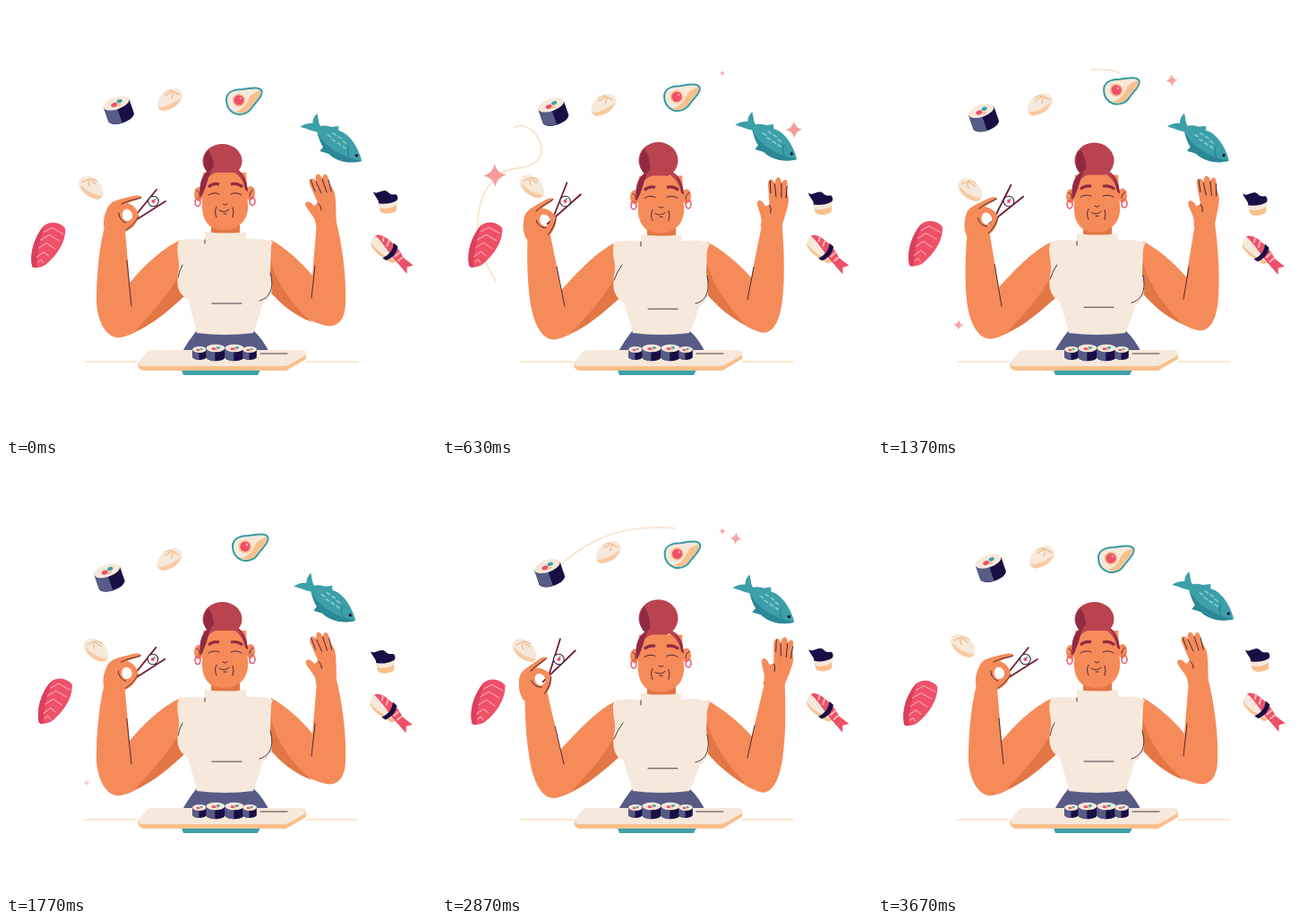
Animation, 480 px wide and 480 px high, one loop 3.7 s. Source, as an HTML page:

```html
<!DOCTYPE html>
<html lang="en">
<head>
<meta charset="utf-8">
<title>Sushi lunch</title>
<style>
html, body { margin: 0; width: 100%; height: 100%; overflow: hidden; background: #fff; }
svg { display: block; width: 100vw; height: 100vh; }
.skin { fill: #f68b5a; }
.shade { fill: #e37645; }
.cream { fill: #f6e8da; }
.peach { fill: #f9bf8c; }
.navy { fill: #190f45; }
.slate { fill: #575b86; }
.teal { fill: #3c9fa9; }
.red { fill: #ee5068; }
.hair { fill: #b9434f; }
.dark { fill: #8f2a42; }
.line { fill: none; stroke: #3a2030; stroke-width: .9; stroke-linecap: round; stroke-linejoin: round; }
.trail { fill: none; stroke: #f8dcc0; stroke-width: 1.3; }
</style>
</head>
<body>
<svg viewBox="0 0 480 480" xmlns="http://www.w3.org/2000/svg">
  <defs>
    <g id="roll">
      <path class="navy" d="M-15-8V9C-12 17 12 17 15 9V-8Z"/>
      <path class="slate" d="M-15-8V9C-12 13-6 15-1 15V-3Z"/>
      <ellipse class="cream" cy="-8" rx="15" ry="6.8"/>
      <ellipse class="red" cx="-3" cy="-7" rx="3.6" ry="2.4"/>
      <ellipse class="teal" cx="4" cy="-9" rx="3.2" ry="2"/>
      <ellipse class="peach" cx="2" cy="-5" rx="2.4" ry="1.3"/>
    </g>
    <g id="bun">
      <path class="cream" d="M-14 5C-13-4-4-11 4-12C11-13 15-7 14-2C12 6 2 12-8 13C-13 12-14 9-14 5Z"/>
      <path class="peach" d="M-13 9C-4 9 6 4 12-2C11 6 2 12-8 13C-11 12-12 11-13 9Z" opacity=".75"/>
      <path d="M3-9L-5-4M4-8L2-1M5-8L10-5M3-9C0-10-4-9-6-7" fill="none" stroke="#efbd8c" stroke-width="1.3" stroke-linecap="round"/>
    </g>
    <g id="avocado">
      <path class="cream" d="M-20-1C-20-11-12-13-2-13C8-14 18-16 20-10C21-4 12 2 8 8C4 14-4 16-10 14C-17 11-20 6-20-1Z" stroke="#349aa2" stroke-width="2"/>
      <path class="peach" d="M18-11C21-5 11 1 7 7C3 13-4 15-11 12C-2 10 3 3 6-4C9-8 14-9 18-11Z"/>
      <circle cx="-6" cy="-1" r="7.2" fill="#f9bf8c"/>
      <circle class="red" cx="-6" cy="-1" r="5.6"/>
      <circle cx="-4" cy="-3" r="1.3" fill="#f9a4a8"/>
    </g>
    <g id="fish">
      <path class="teal" d="M-14-7C-22-8-29-12-35-13C-30-17-25-17-21-17C-21-22-19-25-16-28C-14-21-15-15-10-12Z"/>
      <path class="teal" d="M-17-12C-8-16-4-14 0-13L8-14L8-9C22-5 31 13 34 25C26 28 8 28-3 17C-12 9-14 0-17-12Z"/>
      <path d="M-16-8C-9 8 10 20 33 25C22 28 8 27-3 17L-13 14L-9 9C-12 5-14 0-16-8Z" fill="#2c8796"/>
      <path d="M-4-4l3 2M2-6l3 2M1 1l3 2M8-2l3 2M7 5l3 2M13 3l3 2M13 9l3 2" stroke="#83cccd" stroke-width="1.7" stroke-linecap="round"/>
      <path d="M20 8C17 12 18 17 20 21" fill="none" stroke="#247b8a"/>
      <circle class="navy" cx="28" cy="19" r="1.7"/>
    </g>
    <g id="salmon">
      <path class="red" d="M-18 24C-21 10-16-8-5-21C4-28 15-24 19-18C20-4 10 12-4 23C-10 26-16 27-18 24Z"/>
      <path d="M-18 24C-21 10-16-8-5-21C-8-6-13 8-13 25C-15 26-17 26-18 24Z" fill="#da3f5c"/>
      <path d="M-13 14L-5 8L1 13M-11 4L-2-2L8 5M-9-5L1-11L13-4M-5-14L4-19L17-12M-12 20L-8 17L-5 21" fill="none" stroke="#f99ba4" stroke-width="1.2"/>
    </g>
    <g id="cup">
      <path class="cream" d="M-9 0L13-2L12 9C8 13-2 14-6 10Z"/>
      <path class="peach" d="M-7 6C0 8 7 6 12 3L12 9C8 13-2 14-6 10Z"/>
      <path class="navy" d="M-14-12C-9-8-6-14 0-13C4-12 3-8 11-9C14-8 14-3 12-2C5 2-2 2-8 1C-7-3-13-7-14-12Z"/>
    </g>
    <g id="shrimp" transform="rotate(42)">
      <path class="cream" d="M-25-3C-26 6-20 10-8 10L10 7L13-2Z"/>
      <path class="peach" d="M-23 6C-12 9 0 7 12 2L10 7L-8 10C-16 10-21 9-23 6Z"/>
      <path class="red" d="M-25-3C-22-13 5-11 15-6L29-7L25-1L30 5L15 3C4 3-14-4-25-3Z"/>
      <path d="M-17-9L-14-4M-10-10L-7-3M8-8L7 0M14-6L13 1" stroke="#fbb5b6" stroke-width="2"/>
      <path class="navy" d="M-4-11Q3-2-2 10L3 9Q8-2 2-11Z"/>
    </g>
    <path id="star" d="M0-1Q.18-.18 1 0Q.18.18 0 1Q-.18.18-1 0Q-.18-.18 0-1Z" fill="#f79a98"/>
  </defs>

  <path id="trail" class="trail" pathLength="1" d="M76 327C60 310 40 280 40 245C40 205 62 182 85 181C105 180 112 168 111 158C108 140 92 130 82 135C74 140 84 152 100 144C130 118 165 62 262 72L270 75"/>
  <g id="stars"></g>
  <g id="foods"></g>

  <path d="M88 397H146M335 397H392" stroke="#f8dfbd" stroke-width="1.4"/>
  <path class="teal" d="M195 404H285L281 412H198Z"/>
  <path class="slate" d="M213 362H276Q287 372 294 387H196Q204 373 213 362Z"/>

  <path id="armL" class="skin"/><path id="shadeL" class="shade"/><path id="creaseL" class="line"/>
  <path id="armR" class="skin"/><path id="shadeR" class="shade"/><path id="creaseR" class="line"/>

  <path id="sticks" fill="none" stroke="#721c34" stroke-width="1.8" stroke-linecap="round"/>
  <g id="bite">
    <circle r="5.8" fill="#fff" stroke="#33213f" stroke-width="1.1"/>
    <circle class="red" r="2"/><circle class="teal" cx="2" cy="-2" r="1"/>
  </g>
  <g id="handL">
    <path class="skin" fill-rule="evenodd" d="M110 249C107 239 111 230 114 224C118 217 126 216 134 214C142 212 148 210 151 213C152 216 142 217 136 220C142 222 147 227 148 234C148 241 140 250 133 252Z
      M133 227C128 230 129 238 134 240C140 240 143 235 140 230C138 227 136 226 133 227Z"/>
    <path class="line" d="M151 214C145 216 136 217 129 221M148 235C145 241 139 247 134 250M126 231C126 237 130 241 134 242"/>
  </g>
  <g id="handR">
    <path class="skin" d="M-11 6C-11-4-18-9-22-16C-25-22-19-24-13-17L-9-20L-18-41C-20-48-14-50-11-44C-13-54-7-55-4-47C-3-54 2-54 3-46C4-40 9-36 10-30C12-18 11-8 12 6Z"/>
    <path class="line" d="M-17-46L-12-33M-11-44L-5-31M-4-47L1-32M3-46L6-33M-9-20Q-5-17-5-12"/>
  </g>

  <path id="neck" class="shade" d="M229 232H261V262H229Z"/>
  <path id="shirt" class="cream"/>
  <path id="folds" class="line"/>

  <g id="knot">
    <ellipse class="hair" cx="241.500" cy="173" rx="22" ry="19"/>
    <path class="dark" d="M222 167C218 180 225 190 236 192C229 183 236 176 226 161Q223 163 222 167Z"/>
  </g>
  <g id="head">
    <ellipse class="skin" cx="215" cy="210" rx="5" ry="8"/>
    <ellipse class="skin" cx="273" cy="209" rx="5" ry="8"/>
    <path class="line" d="M213 206Q217 207 216 213M276 205Q272 207 272 212"/>
    <g fill="none" stroke="#ed506b" stroke-width="1.5">
      <ellipse cx="214" cy="219" rx="3" ry="4.500"/><ellipse cx="275" cy="218" rx="3" ry="4.500"/>
    </g>
    <path class="skin" d="M220 186H268L270 222C271 236 263 246 252 249C243 251 235 250 228 246C220 239 218 229 219 217Z"/>
    <path class="hair" d="M217 214C215 194 220 181 242 177C264 180 269 192 270 207L267 205C266 196 260 188 251 183C237 183 227 187 223 196C221 203 221 209 217 214Z"/>
    <path class="dark" d="M217 214C215 197 219 186 230 181C225 191 224 204 217 214ZM259 183C266 189 269 197 270 207L267 205C266 196 264 190 259 183Z"/>
    <path d="M226 202Q232 197 238 199M251 199Q258 197 264 202" fill="none" stroke="#8f2a42" stroke-width="3.200"/>
    <path class="line" d="M226 211Q232 207 238 210M251 210Q257 207 263 211M242 221Q244 223 247 221M238 228Q244 232 249 227M243 232H246M235 224Q232 230 235 236M253 225Q255 230 253 236"/>
  </g>

  <path class="peach" d="M148 397C146 402 149 407 154 407H313L335 394V388Z"/>
  <path class="cream" d="M158 385Q161 384 165 384H332Q338 387 333 391L317 400Q314 402 309 402H152Q146 401 149 396Z"/>
  <path class="line" d="M284 388H314"/>
  <use href="#roll" transform="translate(216 387.500) scale(.52 .5)"/>
  <use href="#roll" transform="translate(234 387) scale(.7 .62)"/>
  <use href="#roll" transform="translate(255 387) scale(.7 .62)"/>
  <use href="#roll" transform="translate(272 387.500) scale(.52 .5)"/>
</svg>
<script>
const LOOP = 3700, BEAT = LOOP / 2, TAU = Math.PI * 2;
const $ = id => document.getElementById(id);
const lerp = (a, b, p) => a + (b - a) * p;
const move = (el, v) => el.setAttribute('transform', v);

// Blend two paths of the same structure
const NUM = /-?\d+(\.\d+)?/g;
const mix = (a, b, p) => {
  const to = b.match(NUM);
  let i = 0;
  return a.replace(NUM, n => lerp(+n, +to[i++], p).toFixed(2));
};

// Relaxed pose, raised pose
const poses = {
  armL: ['M195 261C172 272 153 291 138 309L133 250L110 246C103 275 101 305 101 330C102 352 112 372 128 370C150 366 176 343 198 324Z',
         'M195 264C172 275 152 298 132 319L116 250L92 244C92 275 93 300 97 325C101 352 110 374 126 373C150 369 176 344 198 326Z'],
  shadeL: ['M144 363C160 345 182 322 192 302L200 323C180 342 160 358 144 363Z',
           'M144 366C160 349 182 325 192 305L200 325C180 343 160 360 144 366Z'],
  creaseL: ['M135 284L140 335', 'M126 293L136 335'],
  armR: ['M296 261C312 270 330 286 342 301L347 240L368 238C375 265 380 300 379 330C379 348 372 359 358 357C335 352 312 335 294 318Z',
         'M296 264C312 272 332 288 346 304L360 246L383 244C384 275 384 305 380 330C376 355 368 367 358 367C335 362 312 338 294 320Z'],
  shadeR: ['M296 285C302 310 320 335 342 353C322 346 306 332 294 318Z',
           'M296 288C302 312 320 336 338 357C322 349 306 335 294 320Z'],
  creaseR: ['M345 290L341 326', 'M349 292L341 328'],
  sticks: ['M142 237L168 205M137 244L178 218', 'M118 238L131 195M112 243L148 208'],
  shirt: ['M222 252Q245 255 268 252L268 260C280 259 290 260 298 263C292 275 292 287 295 298C300 318 296 328 286 332C284 345 279 356 276 365Q245 369 213 365C211 355 207 342 203 327C192 322 190 312 192 298C196 285 188 275 193 262C202 259 212 260 222 261Z',
          'M222 256Q245 259 267 256L268 263C280 261 290 262 299 266C294 278 293 290 296 302C300 322 296 332 288 336C284 347 280 358 276 365Q245 369 213 365C211 357 207 346 203 332C192 326 190 316 192 302C196 289 188 278 192 264C202 262 212 262 222 264Z'],
  folds: ['M230 332H263M295 298C300 316 294 326 283 329M222 261V265M197 289Q193 296 192 303',
          'M230 340H263M296 302C300 320 294 331 283 333M222 264V269M202 289Q195 299 192 307']
};

// shape, x, swing, peak ms, y, swing, peak ms, tilt, flip
const foods = [
  ['roll', 120.5, 5.5, 150, 121.5, 5.5, 1950, -19, 1],
  ['bun', 183, 3, 2775, 104.5, 6.5, 980, 0, 1],
  ['avocado', 269.5, 3.5, 1800, 99.5, 6.5, 3650, -2, 1],
  ['fish', 359.7, 3.7, 150, 149, 3, 2550, 0, 1],
  ['salmon', 51, 4, 2000, 265.3, 1.2, 150, 0, 1],
  ['bun', 97.5, 5.5, 1200, 205, 4, 2350, 4, -1],
  ['cup', 422.5, 1.5, 3500, 220, 1.3, 1300, 0, 1],
  ['shrimp', 428, .5, 0, 276, .7, 1850, 0, 1]
];

// x, y, radius, start ms, end ms within a beat
const stars = [
  [59, 189, 13, 250, 900],
  [393, 138, 9.5, 250, 900],
  [328, 83, 7.5, 780, 1620],
  [313, 75, 4, 490, 1230],
  [90, 356, 6.5, 1180, 1830]
];

// Trail ends: ms, share of the path
const front = [[150, 0], [520, .46], [630, .54], [1020, .98], [1120, 1]];
const back = [[520, 0], [630, .05], [1020, .65], [1370, .93], [1500, 1]];

const addUses = (box, rows, name) => rows.map(row => {
  const el = document.createElementNS('http://www.w3.org/2000/svg', 'use');
  el.setAttribute('href', '#' + name(row));
  return $(box).appendChild(el);
});
const foodEls = addUses('foods', foods, f => f[0]);
const starEls = addUses('stars', stars, () => 'star');

const wave = (t, peak) => Math.cos(TAU * (t - peak) / LOOP);

function along(keys, t) {
  if (t <= keys[0][0]) return keys[0][1];
  const i = keys.findIndex(k => k[0] > t);
  if (i < 0) return keys[keys.length - 1][1];
  const [a, u] = keys[i - 1], [b, v] = keys[i];
  return lerp(u, v, (t - a) / (b - a));
}

function draw(t) {
  const beat = t % BEAT;
  const p = (1 - Math.cos(TAU * beat / BEAT)) / 2;

  for (const id in poses) $(id).setAttribute('d', mix(...poses[id], p));
  move($('handL'), `translate(${lerp(141, 115, p)} ${lerp(236, 241, p)}) rotate(${-22 * p}) translate(-141 -236)`);
  move($('handR'), `translate(${lerp(357, 371, p)} ${lerp(240, 245, p)}) rotate(${24 * p})`);
  move($('bite'), `translate(${lerp(164.5, 129.5, p)} 218) rotate(${-22 * p})`);
  move($('head'), `translate(0 ${4.5 * p})`);
  move($('neck'), `translate(0 ${3 * p})`);
  move($('knot'), `translate(0 ${192 + p}) scale(1 ${1 + .1 * p}) translate(0 -192)`);

  foods.forEach(([, x, ax, px, y, ay, py, tilt, flip], i) =>
    move(foodEls[i], `translate(${x + ax * wave(t, px)} ${y + ay * wave(t, py)}) rotate(${tilt}) scale(${flip} 1)`));

  stars.forEach(([x, y, r, from, to], i) => {
    const k = (beat - from) / (to - from);
    const s = k > 0 && k < 1 ? Math.sqrt(Math.sin(Math.PI * k)) : 0;
    move(starEls[i], `translate(${x} ${y}) rotate(${12 - 24 * k}) scale(${r * s})`);
    starEls[i].setAttribute('opacity', s);
  });

  const a = along(back, beat), b = along(front, beat);
  $('trail').setAttribute('stroke-dasharray', `0 ${a} ${b - a} 2`);
  $('trail').setAttribute('visibility', b - a > .001 ? 'visible' : 'hidden');
}

const start = performance.now();
function tick() {
  draw((performance.now() - start) % LOOP);
  requestAnimationFrame(tick);
}
draw(0);
requestAnimationFrame(tick);
</script>
</body>
</html>
```
